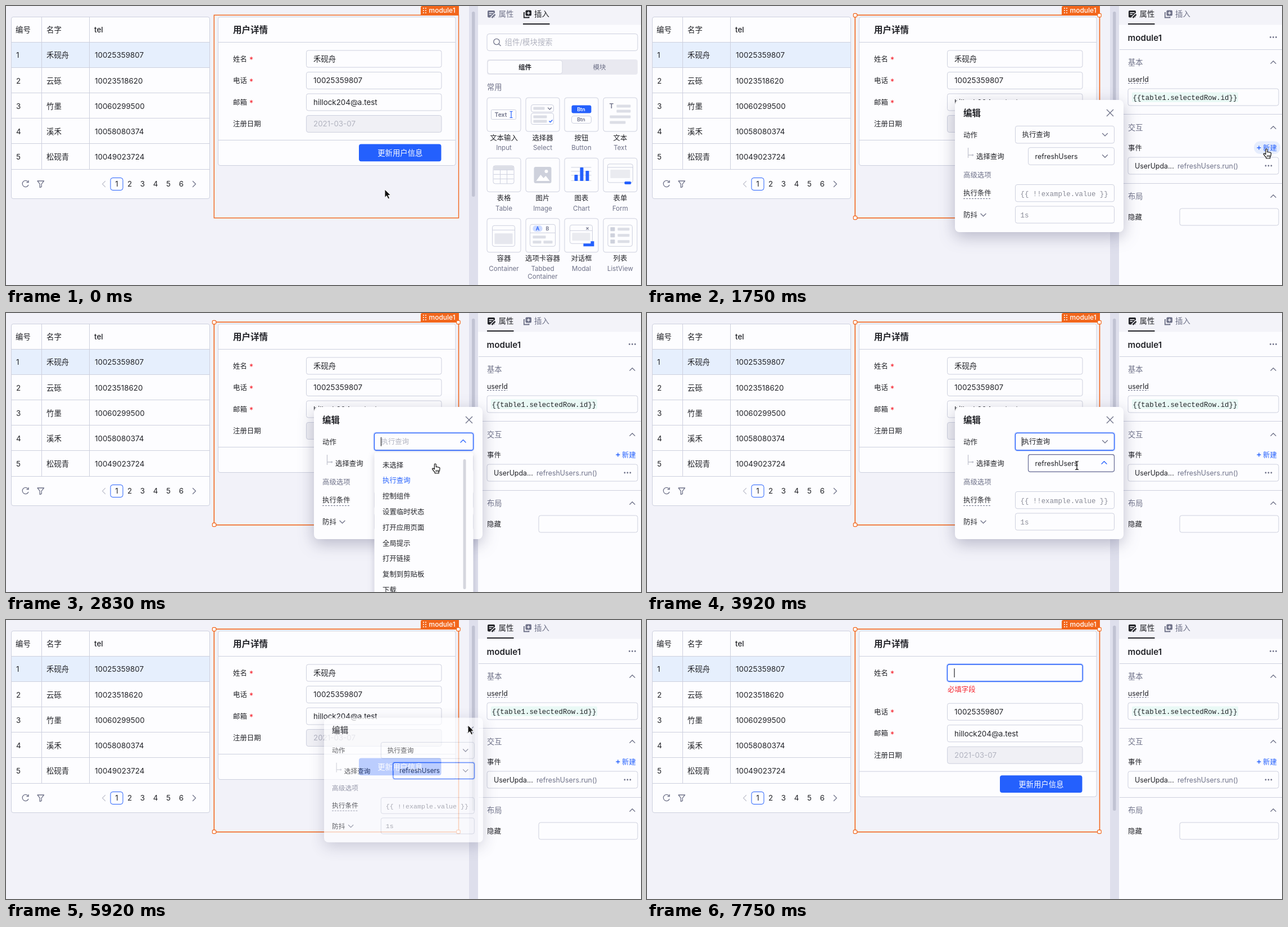
Recreate the animation shown at these times as an HTML page. Size 1130 by 496 pixels, loop 8 s.

```html
<!DOCTYPE html>
<html lang="zh-CN">
<head>
<meta charset="utf-8">
<style>
  html, body { margin: 0; width: 100%; height: 100%; overflow: hidden; background: #f2f2f9; }
  svg { display: block; width: 1130px; height: 496px; }
  text { font-family: Inter, "Noto Sans CJK SC", "Noto Sans CJK", "Noto Sans", sans-serif; white-space: pre; }
  .mono { font-family: "Liberation Mono", monospace; }
</style>
</head>
<body>
<svg id="stage" viewBox="0 0 1130 496" xmlns="http://www.w3.org/2000/svg"></svg>
<script>
const INK = '#222328', GRAY = '#6f7289', PALE = '#b2b4c0', LINE = '#cdd0de', BLUE = '#2460fd',
      ORANGE = '#f2661b', RED = '#f5222d', WHITE = '#fdfdff', BLOCK = '#dcdee6';

// Builders. Boxes are given by their corners, text by the middle of its line.
const box = (x1, y1, x2, y2, fill = WHITE, stroke = LINE, r = 3.5, extra = '') =>
  `<rect x="${x1}" y="${y1}" width="${x2 - x1}" height="${y2 - y1}" rx="${r}" fill="${fill}" stroke="${stroke}" ${extra}/>`;
const fillBox = (x1, y1, x2, y2, fill, r = 0) => box(x1, y1, x2, y2, fill, 'none', r);
const text = (x, cy, s, { size = 12.4, fill = INK, weight = 400, anchor = 'start', cls = '' } = {}) =>
  `<text x="${x}" y="${cy + size * .37}" font-size="${size}" fill="${fill}" font-weight="${weight}" text-anchor="${anchor}" class="${cls}">${s}</text>`;
const path = (d, stroke = LINE, width = 1, extra = '') =>
  `<path d="${d}" fill="none" stroke="${stroke}" stroke-width="${width}" ${extra}/>`;
const group = (id, inner, extra = '') => `<g id="${id}" ${extra}>${inner}</g>`;
const at = (x, y, inner) => `<g transform="translate(${x} ${y})">${inner}</g>`;
const round = 'stroke-linecap="round" stroke-linejoin="round"';
const chevron = (x, y, dir, color = GRAY, s = 4.5) => path({
  up: `M${x - s} ${y + s / 2}l${s} ${-s}l${s} ${s}`, down: `M${x - s} ${y - s / 2}l${s} ${s}l${s} ${-s}`,
  left: `M${x + s / 2} ${y - s}l${-s} ${s}l${s} ${s}`, right: `M${x - s / 2} ${y - s}l${s} ${s}l${-s} ${s}`
}[dir], color, 1.3, round);
const dots = (x, y) => [-5, 0, 5].map(d => `<circle cx="${x + d}" cy="${y}" r="1.4" fill="${GRAY}"/>`).join('');
const caret = (x, y) => path(`M${x} ${y - 8}v16`, INK, 1.2);
const ring = (x1, y1, x2, y2) =>
  box(x1 - 1, y1 - 1, x2 + 1, y2 + 1, 'none', '#c9d7ff', 4, 'stroke-width="2"') +
  box(x1, y1, x2, y2, 'none', BLUE, 3.5, 'stroke-width="1.3"');

const userTable = () => {
  const users = [['禾砚舟', '10025359807'], ['云砾', '10023518620'], ['竹墨', '10060299500'],
                 ['溪禾', '10058080374'], ['松砚青', '10049023724']];
  const big = { size: 13.4 }, head = { size: 13.4, weight: 500 };
  let s = box(9.5, 19.5, 362.5, 342.5) + fillBox(10, 65, 362, 109.5, '#e6effd') +
    text(17, 42, '编号', head) + text(72, 42, '名字', head) + text(157, 42, 'tel', head);
  users.forEach(([name, tel], i) => {
    const y = 87.5 + 45.1 * i;
    s += text(18, y, i + 1, big) + text(72, y, name, big) + text(158, y, tel, big);
  });
  for (let i = 0; i < 6; i++) s += path(`M10 ${64.5 + Math.round(45.1 * i)}H362`);
  s += path('M63.5 20V290M148.5 20V290') +
    path('M39.5 313A5.6 5.6 0 1 0 40 318M40 310v3.6h-3.6', GRAY, 1.3) +
    path('M56 311h11.5l-4.3 5.4v5l-3 1.2v-6.2z', GRAY, 1.3, round) +
    chevron(174, 316.5, 'left', '#c3c5d0', 5) + chevron(335, 316.5, 'right', GRAY, 5) +
    box(186, 305.5, 208, 327.5, WHITE, BLUE, 4);
  for (let i = 0; i < 6; i++) s += text(197 + 23 * i, 316.5, i + 1, { size: 13.4, anchor: 'middle' });
  return s;
};

const field = (y, label, value, required, tone = INK) =>
  text(404, y, label) + (required ? text(433, y + 2, '*', { size: 14, fill: RED }) : '') +
  box(534.5, y - 15, 775, y + 15, required ? WHITE : '#f0f0f5') + text(547, y, value, { size: 13.4, fill: tone });

const form = () =>
  `<rect id="card" x="377.5" y="19.5" width="422.5" height="264" rx="3.5" fill="${WHITE}" stroke="${LINE}"/>` +
  text(404, 42, '用户详情', { size: 15.5, weight: 600 }) + path('M378 64.5H800') +
  field(94, '姓名', '<tspan id="userName"></tspan>', true) +
  group('nameHover', box(534.5, 79, 775, 109, 'none', '#7d8099')) +
  group('nameRing', ring(534.5, 79, 775, 109)) + group('nameCaret', caret(547, 94)) +
  group('error', text(535, 123.5, '必填字段', { fill: RED })) +
  group('lower', field(132.5, '电话', '10025359807', true) +
    field(171, '邮箱', 'hillock204@a.test', true) +
    field(209.5, '注册日期', '2021-03-07', false, PALE) + path('M378 238.5H800') +
    fillBox(628, 245.5, 774.5, 276.3, BLUE, 4) +
    text(701.3, 261, '更新用户信息', { size: 13.4, fill: '#fff', anchor: 'middle' }));

const moduleFrame = () => {
  let s = `<rect id="outline" x="370.3" y="16.2" width="435.2" height="360.6" fill="none" stroke="${ORANGE}"/>` +
    '<path d="M738 16V3q0-3 3-3h65v16z" fill="' + ORANGE + '"/>' +
    text(752.5, 8, 'module1', { size: 12, weight: 500, fill: '#fff' });
  for (let i = 0; i < 6; i++) s += `<circle cx="${743 + i % 2 * 4}" cy="${4 + (i >> 1) * 4}" r="1" fill="#fff"/>`;
  const handles = [[370.5, 16.5], [805, 16.5], [370.5, 376.5], [805, 376.5]]
    .map(([x, y]) => box(x - 3.2, y - 3.2, x + 3.2, y + 3.2, '#fff', ORANGE, 1.5, 'stroke-width="1.2"')).join('');
  return s + group('handles', handles);
};

const tabs = active => {
  const a = active ? GRAY : INK, b = active ? INK : GRAY;
  const lineX = active ? 920 : 856;
  return fillBox(857, 8, 870, 20.5, a, 2) + path('M859.5 11.7h8M859.5 15h4.5', '#f3f3f9', 1.4) +
    path('M863.5 21.5l7.5-7.5', '#f3f3f9', 5) + path('M864.5 20.8l6-6', a, 2.6) +
    path('M923 12h-1.2v8.5h8.7V19', b, 1.8) + fillBox(924.5, 7.5, 935, 17.5, b, 2) +
    path('M929.7 9.7v5.6M926.9 12.5h5.6', '#f3f3f9', 1.4) +
    text(876.5, 14.5, '属性', { size: 13.4, fill: a, weight: active ? 400 : 500 }) +
    text(940, 14.5, '插入', { size: 13.4, fill: b, weight: active ? 500 : 400 }) +
    fillBox(lineX, 31, lineX + 47.5, 33, INK);
};

const bar = (x1, y1, x2, y2 = y1 + 5, fill = BLOCK) => fillBox(x1, y1, x2, y2, fill, 1);
const tiny = (x, y, s, fill = GRAY, size = 9) => text(x, y, s, { size, fill, weight: 600, anchor: 'middle' });
const tileIcons = [
  ['文本输入', ['Input'], box(8, 22, 52, 39, WHITE, LINE, 2) + tiny(25, 30.5, 'Text', GRAY, 10.5) +
    path('M41 25h5M43.5 25v11M41 36h5', BLUE, 1.2)],
  ['选择器', ['Select'], box(10, 13, 50, 26) + bar(14, 17, 34) + chevron(43, 20, 'down', GRAY, 3) +
    box(10, 28, 50, 48) + bar(14, 32, 38) + bar(14, 40, 38) + path('M42 42l2 2l4-4', BLUE, 1.4)],
  ['按钮', ['Button'], fillBox(13, 14, 48, 28, BLUE, 3) + tiny(30, 21.5, 'Btn', '#fff') +
    box(13, 33, 48, 46) + tiny(30, 39.5, 'Btn')],
  ['文本', ['Text'], tiny(15, 15, 'T', GRAY, 12) + bar(24, 13, 49) + bar(24, 22, 49) + bar(12, 32, 49) + bar(12, 42, 40)],
  ['表格', ['Table'], box(11.5, 14, 48.5, 46) + fillBox(12, 14.5, 48, 21, BLOCK) +
    path('M12 21.5h36M12 29.5h36M12 37.5h36M24 21v25M36 21v25')],
  ['图片', ['Image'], fillBox(15, 16, 46, 45, '#ced1dc', 3) +
    '<path d="M19 41l8-11l5 6l4-4l7 9z" fill="#fff"/><circle cx="37" cy="24" r="3" fill="#fff"/>'],
  ['图表', ['Chart'], path('M12 17h36M12 24h36M12 31h36M12 40.5h36') + bar(18, 30, 24, 41, BLUE) +
    bar(28, 17, 34, 41, BLUE) + bar(38, 23, 44, 41, BLUE)],
  ['表单', ['Form'], box(8, 11, 53, 44) + path('M8 17h45') + bar(13, 21, 48, 36, '#eaebf0') + fillBox(38, 42, 50, 47, BLUE, 2)],
  ['容器', ['Container'], box(10, 13, 50, 50) + path('M10 21h40') + bar(14, 27, 46, 46, '#e6e7ee')],
  ['选项卡容器', ['Tabbed', 'Container'], box(8, 11, 53, 50) + path('M8 26h45') + fillBox(13, 13, 30, 24, '#cfdcff', 5) +
    tiny(21.5, 18.5, 'A', BLUE) + tiny(39, 18.5, 'B') + bar(13, 31, 36) + bar(13, 40, 28) + bar(32, 40, 48)],
  ['对话框', ['Modal'], box(10, 12, 50, 45) + path('M10 22h40') + tiny(41, 17, '×', GRAY, 10) +
    bar(14, 26, 46, 40, '#eaebf0') + '<path d="M47 41h6v9H34v-5h13z" fill="' + BLUE + '"/>'],
  ['列表', ['ListView'], box(8.5, 12, 52, 50) + [0, 1, 2].map(i =>
    bar(13, 16 + 11 * i, 21, 23 + 11 * i, '#ced1dc') + bar(26, 17 + 11 * i, 47)).join('')]
];

const insertPanel = () => {
  let s = tabs(1) + box(856, 49.5, 1124, 79.5, WHITE, LINE, 4) +
    '<circle cx="873" cy="63.5" r="5.2" fill="none" stroke="' + GRAY + '" stroke-width="1.3"/>' +
    path('M877 67.5l3.5 3.5', GRAY, 1.3) + text(887.5, 64.5, '组件/模块搜索', { size: 13.4, fill: PALE }) +
    fillBox(856, 95, 1124, 122, '#e9e9f0', 4) + box(857, 96.5, 990, 120.5, WHITE, '#d6d8e3', 4) +
    text(923.5, 108.5, '组件', { size: 11.6, weight: 600, anchor: 'middle' }) +
    text(1056, 108.5, '模块', { size: 11.6, fill: GRAY, anchor: 'middle' }) +
    text(856, 144, '常用', { size: 13.2, fill: GRAY });
  tileIcons.forEach(([name, sub, icon], i) => {
    const tile = box(.5, .5, 60.5, 60.5, WHITE, LINE, 4) + icon +
      text(30.5, 71.5, name, { anchor: 'middle' }) +
      sub.map((w, j) => text(30.5, 89.5 + 13.5 * j, w, { size: 11.6, fill: GRAY, anchor: 'middle' })).join('');
    s += at(855.5 + 69 * (i % 4), 162.5 + 107.4 * Math.floor(i / 4), tile);
  });
  return s;
};

const section = (y, s) => text(856, y, s, { size: 13.2, fill: GRAY }) + chevron(1114.5, y, 'up');
const propertyPanel = () => tabs(0) +
  text(855.5, 56, 'module1', { size: 15.2, weight: 600 }) + dots(1114.5, 55.5) +
  path('M841 77.5H1130M841 192.5H1130M841 315.5H1130') +
  section(100, '基本') + text(856, 130, 'userId') + path('M856 137.5H892', GRAY, 1, 'stroke-dasharray="3 2"') +
  box(856, 147, 1124, 177) + fillBox(863, 153.5, 1052, 171, '#e9f9f5', 2) +
  text(864.5, 162, '{{table1.selectedRow.id}}', { cls: 'mono' }) +
  section(216, '交互') + text(856, 252, '事件') +
  group('linkHover', fillBox(1080, 240.5, 1127, 263, '#e6edfd', 11)) +
  path('M1085.5 252h7M1089 248.5v7', BLUE, 1.4) + text(1096, 252, '新建', { fill: BLUE }) +
  group('noEvent', box(856, 269, 1124, 299, 'none', LINE, 3.5, 'stroke-dasharray="3 2"') +
    text(868, 284.5, '未添加任何事件', { fill: PALE })) +
  group('event', box(856, 269, 1124, 299) + text(868, 284.5, 'UserUpda...') +
    text(944, 284.5, 'refreshUsers.run()', { fill: GRAY }) + dots(1106, 284)) +
  section(338, '布局') + text(856, 375.5, '隐藏') + box(948, 360, 1124, 390);

const actions = ['未选择', '执行查询', '控制组件', '设置临时状态', '打开应用页面', '全局提示', '打开链接', '复制到剪贴板', '下载'];
const shadow = (y, blur, a) => `style="filter:drop-shadow(0 ${y}px ${blur}px rgba(50,50,90,${a}))"`;
const select = (id, x, y, value) => box(x, y - 15.3, 831.5, y + 15.3) +
  group(id + 'Hover', box(x, y - 15.3, 831.5, y + 15.3, 'none', '#666a94', 3.5, 'stroke-width="1.2"')) +
  group(id + 'Ring', ring(x, y - 15.3, 831.5, y + 15.3)) +
  group(id + 'Text', text(x + 12, y, value, { fill: 'currentColor' })) +
  group(id + 'Caret', caret(x + 12, y)) +
  group(id + 'Down', chevron(815, y, 'down')) + group(id + 'Up', chevron(813.5, y - 1, 'up', BLUE));

const dialog = () => group('popup',
  fillBox(548, 167, 848, 402, WHITE, 8) + text(563, 190.5, '编辑', { size: 15.4, weight: 600 }) +
  path('M818 184l12 12M830 184l-12 12', GRAY, 1.4) +
  text(563, 229, '动作') + select('one', 655.5, 228.7, '执行查询') +
  path('M571.5 252v18M571.5 265h9', '#c3c5d0', 1.3) + '<circle cx="579.5" cy="265" r="1.8" fill="#c3c5d0"/>' +
  text(586, 267.5, '选择查询') + select('two', 678.5, 267, 'refreshUsers') +
  text(563, 300, '高级选项', { fill: GRAY }) +
  text(563, 332, '执行条件') + path('M563 342.5H613', GRAY, 1, 'stroke-dasharray="3 2"') +
  text(563, 371.5, '防抖') + chevron(598.5, 371.5, 'down') +
  box(655.5, 317.5, 831.5, 347.8) + text(664.5, 333, '{{ !!example.value }}', { fill: '#8a8c98', cls: 'mono' }) +
  box(655.5, 356, 831.5, 386) + text(664.5, 371, '1s', { fill: '#8a8c98', cls: 'mono' }), shadow(8, 14, .3)) +
  group('menuOne', fillBox(655.5, 248, 831.5, 510, WHITE, 4) + fillBox(813.5, 260, 818.5, 491, '#d5d6de', 2.5) +
    actions.map((s, i) => text(670, 270 + 27.8 * i, s, { fill: i === 1 ? BLUE : INK })).join(''), shadow(3, 6, .22)) +
  group('menuTwo', fillBox(678.5, 286, 831.5, 330, WHITE, 4) +
    text(690.5, 308, 'refreshUsers', { fill: BLUE }), shadow(2, 3, .18));

const cursors = () => group('cursor',
  group('arrow', '<path d="M0 0v14.5l3.4-3.1l2.6 5.6l2.6-1.2l-2.5-5.4h4.6z" fill="#111" stroke="#fff"/>') +
  group('hand', '<path d="M-1.6 1.6q0-1.6 1.4-1.6t1.5 1.6v4.2q1-.8 2.3.1q1.3-.5 2.1.6q1.8-.5 2.3 1.2l-.4 4.3l-1.5 2.6v2.4h-6.8v-1.7q-2.2-2-4.6-5.6q-.4-1.9 1.4-1.7l2.3 1.8z" fill="#fff" stroke="#111" stroke-width="1.2" stroke-linejoin="round"/>' +
    path('M1.2 11v3.6M3.3 11v3.6M5.4 11v3.6', '#111')) +
  group('beam', path('M-3 -7.5q3 0 3 2v11q0 2-3 2M3 -7.5q-3 0-3 2v11q0 2 3 2M-1.5 0h3', '#111', 1.2)));

const stage = document.getElementById('stage');
stage.innerHTML = fillBox(0, 0, 1130, 496, '#f2f2f9') + userTable() + form() + moduleFrame() +
  fillBox(824, 0, 840, 496, '#dedfec') + fillBox(829, 10, 834.5, 339, '#c1c3d3', 2.5) +
  fillBox(840, 0, 1130, 496, '#fcfcff') + fillBox(840, 0, 1130, 33.5, '#f3f3f9') +
  group('insert', insertPanel()) + group('props', propertyPanel()) + dialog() + cursors();

const el = {};
stage.querySelectorAll('[id]').forEach(n => el[n.id] = n);
const fade = (id, v) => {
  el[id].style.opacity = Number(v);
  el[id].style.display = v > 0 ? '' : 'none';
};
const ease = x => x * x * (3 - 2 * x);
const ramp = (k, a, b) => ease(Math.min(1, Math.max(0, (k - a) / (b - a))));
const within = (k, a, b) => k >= a && k < b;

// Pointer stops: [tick, x, y]
const route = [[4, 674, 326], [6, 674, 322], [8, 676, 322], [15, 1103, 248], [17, 1103, 254], [26, 1102, 254],
  [30, 766, 230], [32, 766, 230], [34, 764, 268], [38, 764, 300], [43, 764, 294], [47, 765, 271], [50, 765, 271],
  [53, 760, 305], [59, 758, 306], [67, 822, 187], [72, 822, 187], [79, 689, 94]];
const pointer = k => {
  const i = route.findIndex(p => p[0] >= k);
  if (i < 1) return route[i < 0 ? route.length - 1 : 0].slice(1);
  const [a, b] = [route[i - 1], route[i]], p = ramp(k, a[0], b[0]);
  return [a[1] + (b[1] - a[1]) * p, a[2] + (b[2] - a[2]) * p];
};
const pointerShape = k => {
  if (k >= 88) return '';
  if (within(k, 30, 33) || within(k, 46, 52) || k >= 77) return 'beam';
  return within(k, 13, 28) || within(k, 33, 46) || within(k, 52, 62) ? 'hand' : 'arrow';
};

function drawSelect(id, { hover, focus, open, caretOn }) {
  fade(id + 'Hover', hover);
  fade(id + 'Ring', focus);
  fade(id + 'Up', open);
  fade(id + 'Down', !open);
  fade(id + 'Caret', caretOn);
}

function render(ms) {
  const k = Math.floor((ms % 8000 + 5) * 12 / 1000);   // twelve ticks a second

  const selected = k >= 7;
  fade('insert', !selected);
  fade('props', selected);
  fade('handles', selected);
  el.outline.setAttribute('stroke-width', selected ? 1.6 : 1.4);

  fade('event', k >= 19);
  fade('noEvent', k < 19);
  fade('linkHover', ramp(k, 18, 20) - ramp(k, 26, 29));

  const shown = ramp(k, 18, 21) - ramp(k, 69, 74.5), scale = 1 - .19 * (1 - shown);
  fade('popup', shown);
  el.popup.setAttribute('transform', `translate(863 284) scale(${scale}) translate(-863 -284)`);
  fade('menuOne', ramp(k, 32, 34) - ramp(k, 43, 46));
  fade('menuTwo', ramp(k, 49, 51) - ramp(k, 55, 58));
  drawSelect('one', { hover: within(k, 30, 32) || within(k, 62, 65), focus: within(k, 32, 50), open: within(k, 33, 44), caretOn: within(k, 33, 50) });
  drawSelect('two', { hover: within(k, 46, 50), focus: k >= 50, open: within(k, 47, 56), caretOn: within(k, 50, 56) });
  el.oneText.style.color = within(k, 33, 44) ? PALE : INK;
  el.twoText.style.color = within(k, 50, 56) ? PALE : INK;

  const letters = k < 88 ? 3 : k < 90 ? 2 : k < 91 ? 1 : 0;
  el.userName.textContent = '禾砚舟'.slice(0, letters);
  fade('nameHover', within(k, 78, 81));
  fade('nameRing', k >= 81);
  fade('nameCaret', k >= 81);
  el.nameCaret.setAttribute('transform', `translate(${letters * 13.4} 0)`);

  const grow = ramp(k, 91, 93), shift = 30.7 * grow;
  fade('error', grow);
  el.lower.setAttribute('transform', `translate(0 ${shift})`);
  el.card.setAttribute('height', 264 + shift);

  const shape = pointerShape(k);
  for (const id of ['arrow', 'hand', 'beam']) fade(id, id === shape);
  el.cursor.setAttribute('transform', `translate(${pointer(k).join(' ')})`);
}

const start = performance.now();
const loop = () => {
  render(performance.now() - start);
  requestAnimationFrame(loop);
};
loop();
</script>
</body>
</html>
```
